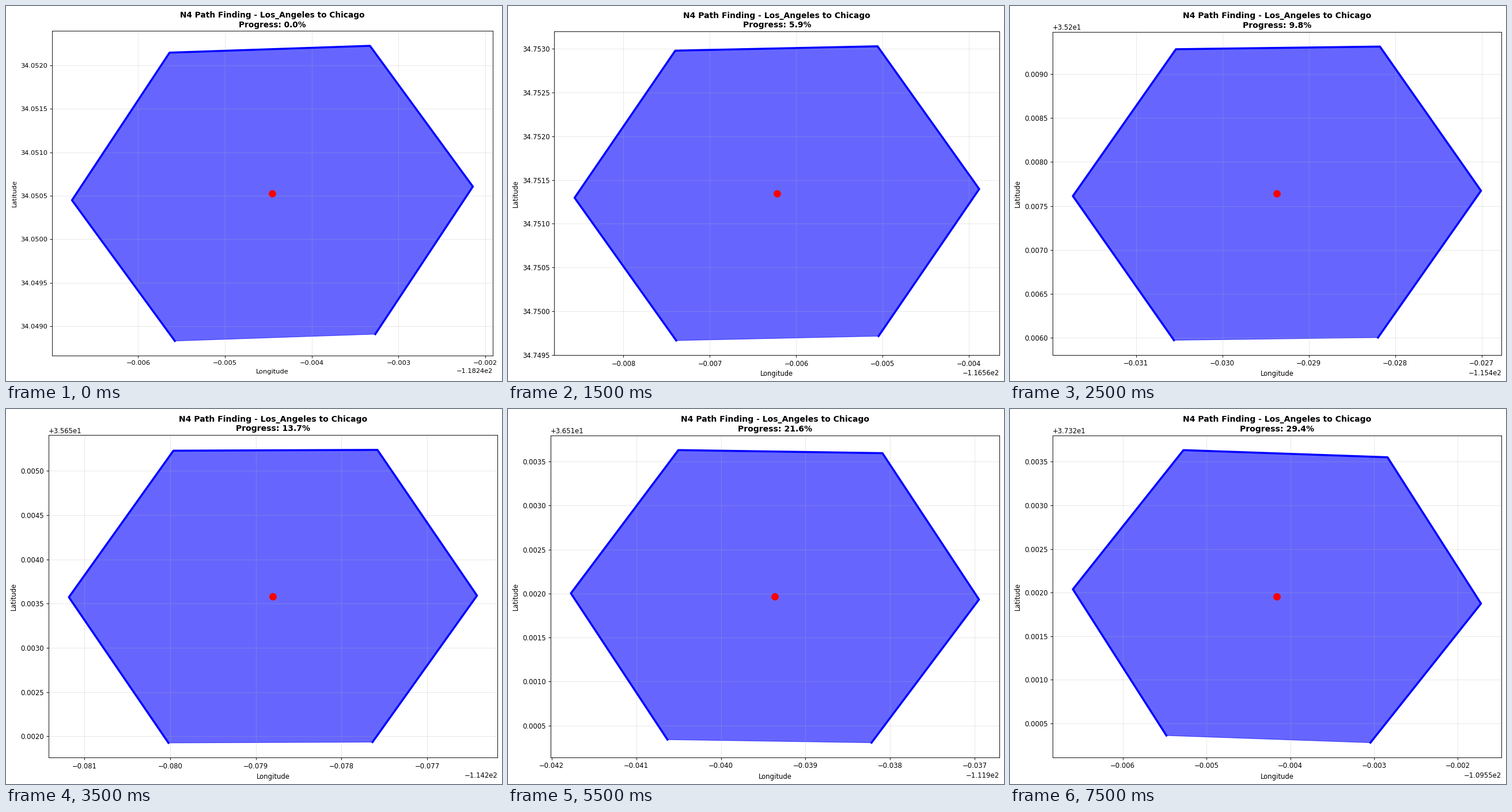
Animation of 861x650 px, one loop 8000 ms. Source, as a matplotlib script:

```python
import numpy as np
import matplotlib.pyplot as plt
from matplotlib.animation import FuncAnimation

W, H, DPI = 861, 650, 64
STEPS, SHOWN = 51, 16

# Hexagonal grid laid out on a gnomonic plane (icosahedron face)
LAT0, LON0 = 0.427370518328979641, -1.888876200336285401
TURN = 3.532912002790141181 - np.arcsin(np.sqrt(3 / 28))
UNIT = 0.38196601125010500003 / 7 ** 4.5
CORNERS = np.exp(1j * np.radians(np.arange(30, 360, 60))) / np.sqrt(3)

# Straight line of cells, sampled at a fixed stride
START, SPAN, STRIDE = (-4293, -3031), (729, 8065), 161

# Page layout in inches
AX_W, TOP, BOTTOM, SIDE = 9.3, 0.527, 0.531, 0.095
YLABEL_ROOM = 0.394


def to_geo(h):
    z = np.conj(h * UNIT * np.exp(-1j * TURN))
    north, east = z.real, z.imag
    lat = np.arcsin((np.sin(LAT0) + north * np.cos(LAT0)) / np.hypot(1, np.abs(z)))
    lon = LON0 + np.arctan2(east, np.cos(LAT0) - north * np.sin(LAT0))
    return np.degrees(lon), np.degrees(lat)


def cell(n):
    i = START[0] + round(SPAN[0] * STRIDE * n / SPAN[1])
    j = START[1] + STRIDE * n
    return i + j * np.exp(2j * np.pi / 3)


def label_width(text):
    em = sum({".": 0.318, "\N{MINUS SIGN}": 0.838}.get(c, 0.636) for c in text)
    return em * 10 / 72


def visible_ticks(axis):
    lo, hi = axis.get_view_interval()
    locs = axis.get_majorticklocs()
    texts = axis.get_major_formatter().format_ticks(locs)
    return [((t - lo) / (hi - lo), s) for t, s in zip(locs, texts) if lo <= t <= hi]


fig = plt.figure(figsize=(W / DPI, H / DPI), dpi=DPI, facecolor="white")
ax = fig.add_axes([0.1, 0.1, 0.8, 0.8])


def place_axes():
    """Fit the tightly cropped page to the stage; return both scales."""
    x0, x1 = ax.get_xlim()
    y0, y1 = ax.get_ylim()
    ax_h = AX_W * (y1 - y0) / (x1 - x0)
    left = YLABEL_ROOM + max(label_width(s) for _, s in visible_ticks(ax.yaxis))
    over = max(p * AX_W + label_width(s) / 2 - AX_W for p, s in visible_ticks(ax.xaxis))
    page_w = left + AX_W + SIDE + max(0, over)
    page_h = TOP + ax_h + BOTTOM
    ax.set_position([left / page_w, BOTTOM / page_h, AX_W / page_w, ax_h / page_h])
    return W / page_w / DPI, H / page_h / DPI


def draw(n):
    ax.clear()
    center = cell(n)
    lon, lat = to_geo(center + CORNERS)
    patch, = ax.fill(lon, lat, color="blue", alpha=0.6)
    edge, = ax.plot(lon, lat, color="blue")
    dot, = ax.plot(*to_geo(center), "ro")

    k, v = place_axes()
    patch.set_linewidth(k)
    edge.set_linewidth(3 * k)
    dot.set_markersize(10 * k)
    dot.set_markeredgewidth(k)
    ax.grid(True, alpha=0.3, linewidth=0.8 * k)
    for spine in ax.spines.values():
        spine.set_linewidth(0.8 * k)
    for axis, name, s in ((ax.xaxis, "x", v), (ax.yaxis, "y", k)):
        ax.tick_params(axis=name, labelsize=10 * k, width=0.8 * k,
                       length=3.5 * s, pad=3.5 * s)
        axis.offsetText.set_fontsize(10 * k)
        axis.OFFSETTEXTPAD = 3 * v
    ax.set_xlabel("Longitude", fontsize=10 * k, labelpad=4 * v + 12 * (v - k))
    ax.set_ylabel("Latitude", fontsize=10 * k, labelpad=4 * k)
    ax.set_title("N4 Path Finding - Los_Angeles to Chicago\n"
                 f"Progress: {100 * n / STEPS:.1f}%",
                 fontsize=12 * k, fontweight="bold", pad=6 * v,
                 linespacing=1.2 * v / k)
    return []


anim = FuncAnimation(fig, draw, frames=SHOWN, interval=500, repeat=True,
                     repeat_delay=0, blit=False)
plt.show()
```
